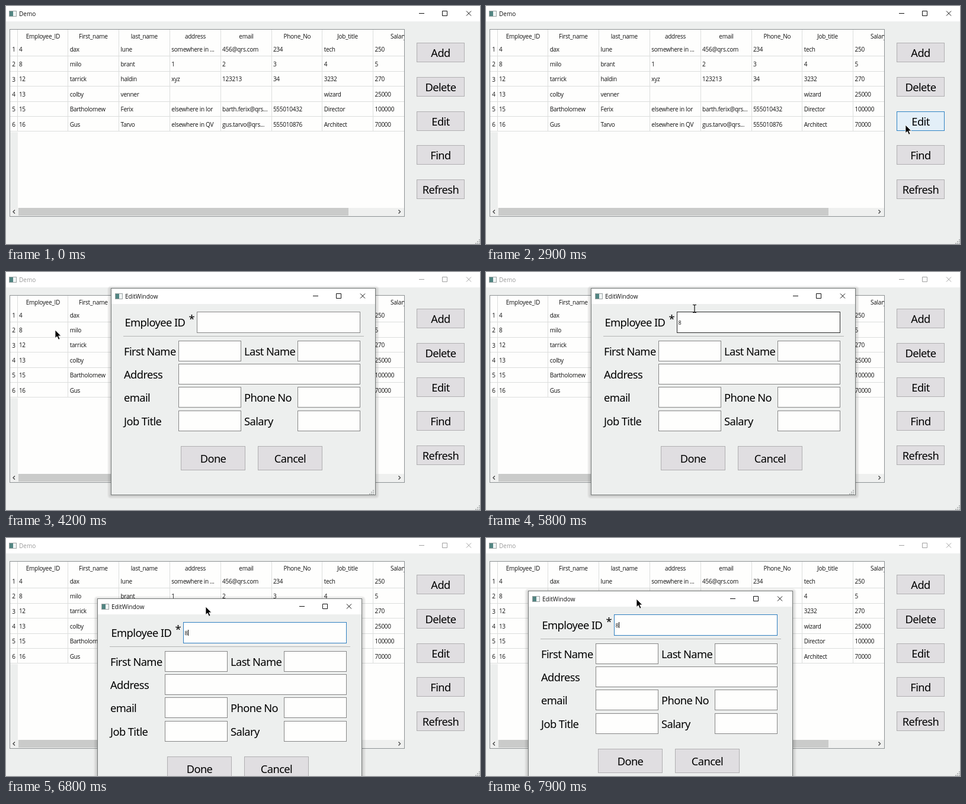
Write an HTML page that moves like this. It is 800 by 402 pixels and loops after 8 s.

```html
<!DOCTYPE html>
<html lang="en">
<head>
<meta charset="utf-8">
<title>Demo</title>
<style>
  html, body { margin: 0; width: 100%; height: 100%; overflow: hidden; background: #edefee; }
  svg { display: block; width: 800px; height: 402px; }
  text { font: 10px "Open Sans", "Noto Sans", sans-serif; letter-spacing: -0.26px; fill: #111; white-space: pre; }
  text.big { font: 18.3px "Noto Sans", "Open Sans", sans-serif; letter-spacing: -0.58px; fill: #000; }
  text.mid { text-anchor: middle; }
  text.title { letter-spacing: 0; }
  text.typed { font-size: 9px; }
  .button { fill: #e0dee1; stroke: #b0afb1; }
  .button.hover { fill: #e3eff8; stroke: #2f83c4; }
  .button.down { fill: #cce4f7; stroke: #00549a; }
  .field { fill: #fefefd; stroke: #868686; }
  .field.focus { stroke: #2f7fc0; }
  .field.hover { stroke: #2b2b2b; }
  .glyph { fill: none; stroke: #111; }
  .inactive .glyph { stroke: #a2a2a2; }
  .inactive text { fill: #9a9a9a; }
</style>
</head>
<body>
<svg id="stage" viewBox="0 0 800 402" xmlns="http://www.w3.org/2000/svg"></svg>
<script>
const stage = document.getElementById("stage");

function add(parent, tag, attrs = {}, content) {
  const el = document.createElementNS("http://www.w3.org/2000/svg", tag);
  for (const key in attrs) el.setAttribute(key, attrs[key]);
  if (content !== undefined) el.textContent = content;
  return parent.appendChild(el);
}
const box = (p, x, y, width, height, attrs) => add(p, "rect", { x, y, width, height, ...attrs });
const line = (p, d, stroke) => add(p, "path", { d, stroke, fill: "none" });
const label = (p, x, y, str, cls = "") => add(p, "text", { x, y, class: cls }, str);

// Box whose 1px outline lies on the given outer edges
const outlined = (p, x, y, w, h, attrs) => box(p, x + .5, y + .5, w - 1, h - 1, attrs);

function button(p, x, y, w, h, str) {
  const el = outlined(p, x, y, w, h, { class: "button" });
  label(p, x + w / 2, y + h / 2 + 7, str, "big mid");
  return el;
}

function titleBar(p, x, y, w, str, inset = 0) {
  const g = add(p, "g");
  box(g, x, y, w, 26, { fill: "#fff" });
  const left = x + inset, right = x + w - 2 * inset, cy = y + 12.5;
  outlined(g, left + 5, y + 8, 13, 10, { fill: "#f1f5f5", stroke: "#9da4a4" });
  box(g, left + 6, y + 9, 6, 8, { fill: "#528582" });
  label(g, left + 22, y + 16.7, str, "title");
  add(g, "path", { class: "glyph", d:
    `M${right - 103} ${cy}h9M${right - 63.5} ${cy - 4}h8v8h-8z` +
    `M${right - 23} ${cy - 4}l8 8m0 -8l-8 8` });
  return g;
}

function grip(p, right, bottom) {
  for (let i = 0; i < 3; i++)
    for (let j = 0; j <= i; j++)
      box(p, right - 2 - 3 * j, bottom - 8 + 3 * i, 2, 2, { fill: "#b5b8b8" });
}

// Main window
box(stage, 0, 0, 800, 402, { fill: "#edefee" });
const mainBar = titleBar(stage, 0, 0, 800, "Demo");

const headers = ["Employee_ID", "First_name", "last_name", "address", "email", "Phone_No", "Job_title", "Salary"];
const rows = [
  "4|dax|lune|somewhere in ...|456@qrs.com|234|tech|250",
  "8|milo|brant|1|2|3|4|5",
  "12|tarrick|haldin|xyz|123213|34|3232|270",
  "13|colby|venner||||wizard|25000",
  "15|Bartholomew|Ferix|elsewhere in lor|barth.ferix@qrs...|555010432|Director|100000",
  "16|Gus|Tarvo|elsewhere in QV|gus.tarvo@qrs...|555010876|Architect|70000"
];
const COL = 85.8, ROW = 25.4, LEFT = 19.5, TOP = 60;

const clip = add(add(stage, "defs"), "clipPath", { id: "view" });
box(clip, 7, 40, 665, 315);
const table = add(stage, "g", { "clip-path": "url(#view)" });
box(table, 7, 40, 665, 315, { fill: "#fefefd" });
box(table, 7, 213, 13, 128, { fill: "#edefee" });

headers.forEach((name, c) => {
  const x = Math.round(LEFT + c * COL);
  label(table, x + COL / 2 - .5, 54.7, name, "mid");
  line(table, `M${x - .5} 40V212`, "#dcdedd");
});
rows.forEach((row, r) => {
  const y = TOP + r * ROW;
  line(table, `M7 ${Math.round(y + ROW) - .5}H672`, "#dcdedd");
  label(table, 13, y + 16.8, r + 1, "mid");
  row.split("|").forEach((cell, c) => label(table, LEFT + 2.4 + c * COL, y + 16.6, cell));
});

box(table, 7, 341, 665, 14, { fill: "#eff0ef" });
box(table, 21, 341, 557, 13, { fill: "#cacbca" });
add(table, "path", { d: "M15 344.5l-3 3l3 3M662.5 344.5l3 3l-3 3", fill: "none", stroke: "#444", "stroke-width": 1.4 });
outlined(stage, 6, 39, 667, 317, { fill: "none", stroke: "#8d9294" });

const sideButtons = ["Add", "Delete", "Edit", "Find", "Refresh"].map((name, i) =>
  button(stage, 693, Math.round(62 + i * 57.8), 81, 33, name));
const editButton = sideButtons[2];
grip(stage, 800, 402);

// Edit dialog
const dialog = add(stage, "g");
for (let i = 6; i > 0; i--)
  box(dialog, 177 - i, 29 - i, 447 + 2 * i, 348 + 2 * i, { rx: i, fill: "#000", opacity: .028 });
outlined(dialog, 177, 27, 447, 350, { fill: "#edefee", stroke: "#747877" });
titleBar(dialog, 178, 28, 445, "EditWindow", 1);

const field = (x, y, w, h = 35) => outlined(dialog, x, y, w, h, { class: "field" });
label(dialog, 200.5, 92, "Employee ID", "big");
label(dialog, 308.5, 86.2, "*", "big");
const idField = field(322, 67, 276, 36);
const idText = label(dialog, 324.5, 88.5, "8", "typed");
const caret = box(dialog, 330, 80, 1, 10, { fill: "#000" });
line(dialog, "M198 108.5H604", "#b4b5b5");

[["First Name", "Last Name"], ["Address"], ["email", "Phone No"], ["Job Title", "Salary"]].forEach((names, i) => {
  const y = Math.round(116 + i * 39.2);
  names.forEach((name, c) => {
    label(dialog, c ? 402 : 199, y + 25, name, "big");
    field(c ? 492 : 291, y, names.length > 1 ? 106 : 307);
  });
});
button(dialog, 295, 294, 109, 41, "Done");
button(dialog, 425, 294, 109, 41, "Cancel");
grip(dialog, 621, 376);

// Pointer
const pointer = add(stage, "g");
const arrow = add(pointer, "path", {
  d: "M0 0V13.6L3.2 10.8L5.6 16.2L8 15.1L5.6 9.9H9.8Z",
  fill: "#000", stroke: "#fff", "stroke-width": .8
});
const beam = add(pointer, "path", {
  d: "M-3 -6.5h2.2l.8 .8l.8 -.8h2.2M0 -5.7V5.7M-3 6.5h2.2l.8 -.8l.8 .8h2.2",
  fill: "none", stroke: "#111", "stroke-width": 1.2
});

// Time, x, y
const pointerPath = [
  [2300, 640, 300], [2800, 708, 201], [3400, 708, 201], [4100, 83, 98],
  [4500, 83, 98], [5100, 372, 86], [5600, 370, 84], [5800, 352, 62], [6200, 360, 40.5]
];
const dragPath = [[6400, 0, 0], [6800, -23, 75], [7300, -86, 69], [7900, -106, 62]];
const LOOP = 8000, STEP = 100;
const SHOW = 2300, PRESS = 3100, OPEN = 3300, FOCUS = 5200, TYPE = 5500, DRAG = 6400, BLINK = 530;

function along(path, t) {
  if (t <= path[0][0]) return path[0].slice(1);
  for (let i = 1; i < path.length; i++) {
    const [t0, x0, y0] = path[i - 1], [t1, x1, y1] = path[i];
    if (t <= t1) {
      const k = (t - t0) / (t1 - t0), e = k * k * (3 - 2 * k);
      return [x0 + (x1 - x0) * e, y0 + (y1 - y0) * e];
    }
  }
  return path[path.length - 1].slice(1);
}
const show = (el, on) => el.setAttribute("visibility", on ? "visible" : "hidden");
const move = (el, x, y) => el.setAttribute("transform", `translate(${Math.round(x)} ${Math.round(y)})`);

function render(t) {
  const [dx, dy] = along(dragPath, t);
  const [px, py] = along(pointerPath, t);
  const open = t >= OPEN, focused = t >= FOCUS;
  const overField = open && px >= 322 && px <= 598 && py >= 60 && py <= 104;
  const overEdit = !open && t >= SHOW && px >= 693 && px <= 774 && py >= 178 && py <= 211;

  mainBar.setAttribute("class", open ? "inactive" : "");
  editButton.setAttribute("class", "button" + (overEdit ? t >= PRESS ? " down" : " hover" : ""));

  dialog.setAttribute("display", open ? "inline" : "none");
  move(dialog, dx, dy);
  idField.setAttribute("class", "field" + (overField ? " hover" : focused ? " focus" : ""));
  show(idText, t >= TYPE);
  caret.setAttribute("x", t >= TYPE ? 330 : 325);
  show(caret, focused && (t >= DRAG || Math.floor((t - FOCUS) / BLINK) % 2 === 0));

  pointer.setAttribute("display", t >= SHOW ? "inline" : "none");
  move(pointer, px + dx, py + dy);
  show(arrow, !overField);
  show(beam, overField);
}

const start = performance.now();
function tick() {
  const t = (performance.now() - start) % LOOP;
  render(Math.floor(t / STEP) * STEP);
  requestAnimationFrame(tick);
}
tick();
</script>
</body>
</html>
```
